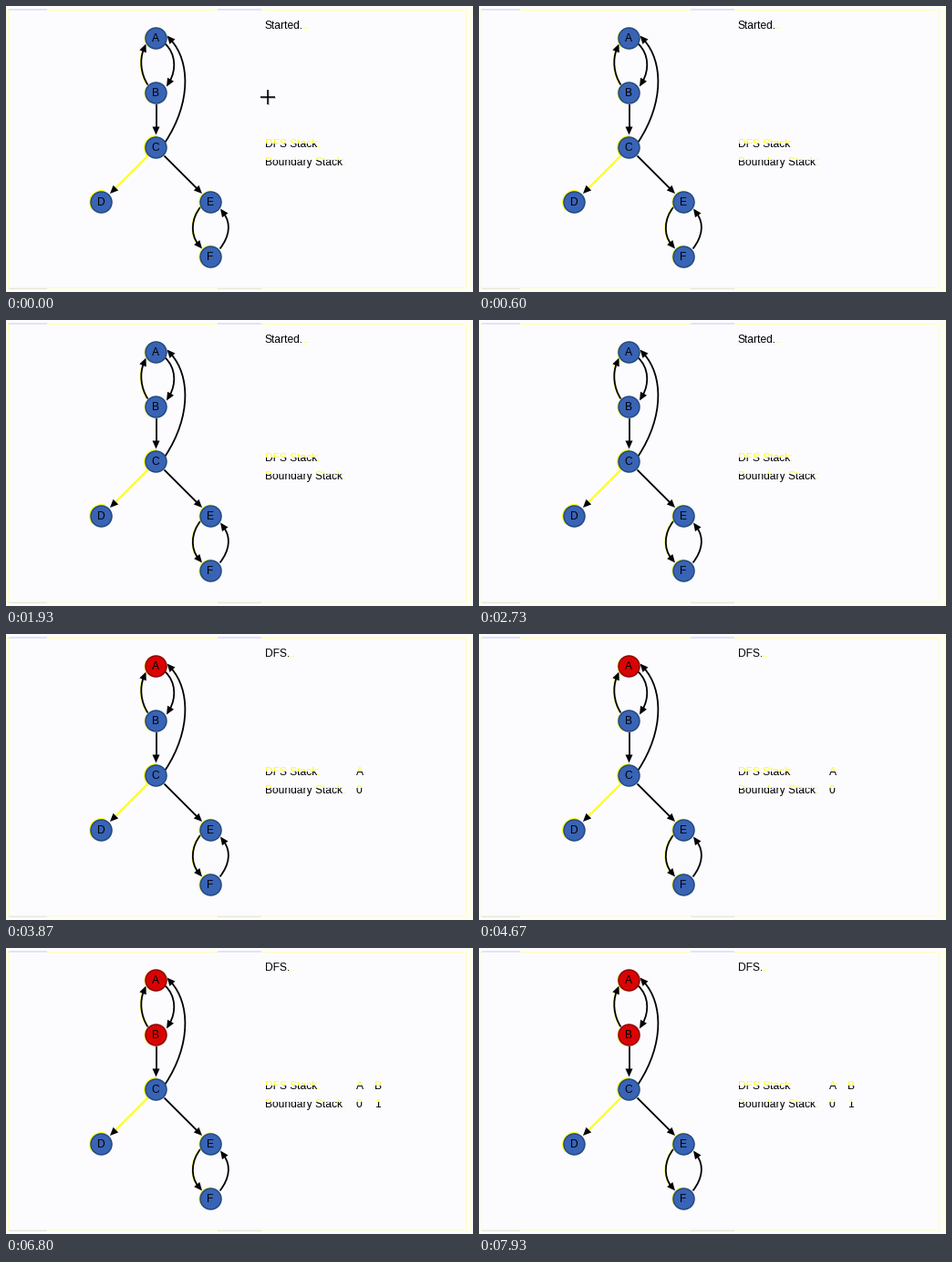
These frames come from a looping animation (512 by 314 pixels, 8 s). A matplotlib script:

```python
import numpy as np
import matplotlib.pyplot as plt
from matplotlib.animation import FuncAnimation
from matplotlib.patches import Arc, Circle, PathPatch, Polygon, Rectangle
from matplotlib.path import Path

W, H, DPI = 512, 314, 100
PX = 72 / DPI
STEP, FRAMES = 50, 160
VISIT_A, VISIT_B = 3270, 6130
CURSOR_END = 550

YELLOW = "#ffff1e"
PALE = "#ffffb4"
LAVENDER = "#e2e2fa"
BLUE, BLUE_RIM = "#3963b5", "#234a7c"
RED, RED_RIM = "#d90303", "#8c0505"

plt.rcParams["font.family"] = "Liberation Sans"
fig = plt.figure(figsize=(W / DPI, H / DPI), dpi=DPI, facecolor="#fcfcff")
ax = fig.add_axes([0, 0, 1, 1])
ax.set_xlim(0, W)
ax.set_ylim(H, 0)
ax.axis("off")


def box(x, y, w, h, color):
    ax.add_patch(Rectangle((x, y), w, h, fc=color, ec="none", lw=0, zorder=0))


def label(x, y, s, color="black", z=6, **kw):
    return ax.text(x, y, s, size=12 * PX, color=color, va="baseline",
                   zorder=z, **kw)


def clipped(x, y, s, color, top, bottom):
    text = label(x, y, s, color)
    text.set_clip_path(Rectangle((0, top), W, bottom - top,
                                 transform=ax.transData))
    text.set_clip_on(True)
    return text


def two_tone(x, y, s, split):
    """Text that is yellow above a level and black below it."""
    return [clipped(x, y, s, YELLOW, 0, split),
            clipped(x, y, s, "black", split, H)]


def stack_column(x, upper, lower):
    return two_tone(x, 155, upper, 151) + two_tone(x, 175, lower, 169)


def curve(points, color, width, z):
    codes = [Path.MOVETO] + [Path.CURVE4] * 3
    if len(points) == 2:
        codes = [Path.MOVETO, Path.LINETO]
    ax.add_patch(PathPatch(Path(points, codes), fc="none", ec=color,
                           lw=width * PX, capstyle="butt", zorder=z))


def edge(*points, color="black", width=1.8, glow=False):
    pts = np.array(points, float) + 0.5
    tip = pts[-1].copy()
    d = tip - pts[-2]
    d /= np.hypot(*d)
    side = np.array([-d[1], d[0]]) * 4
    base = tip - 9 * d
    pts[-1] = tip - 7 * d
    if glow:
        curve(pts - [1, 0], YELLOW, 0.9, 1)
    curve(pts, color, width, 2)
    ax.add_patch(Polygon([tip, base + side, base - side], fc="black",
                         ec="none", lw=0, zorder=3))


def node(name, x, y, start, end, glow):
    center = (x + 0.5, y + 0.5)
    ax.add_patch(Arc(center, 25, 25, theta1=start, theta2=end, ec=YELLOW,
                     lw=glow * PX, zorder=3))
    disc = Circle(center, 11.5, fc=BLUE, ec=BLUE_RIM, lw=1.5 * PX, zorder=4)
    ax.add_patch(disc)
    label(x, y + 4, name, ha="center")
    return disc


# Panel rim
box(0, 4, 505, 1, PALE)
box(0, 309, 505, 1, PALE)
box(2, 4, 1, 306, PALE)
box(504, 4, 1, 306, PALE)
box(508, 0, 3, H, "#ffffe4")
for x0, x1 in ((3, 45), (232, 280)):
    box(x0, 3, x1 - x0, 1.5, LAVENDER)
    box(x0, 309.5, x1 - x0, 1.5, LAVENDER)

# Graph: angles run clockwise on screen because y points down
edge((155, 86), (147, 74), (146, 58), (153, 41), glow=True)
edge((174, 41), (186, 52), (186, 70), (175.5, 88))
edge((164, 107), (164, 141))
edge((174, 149), (203, 105), (201, 60), (176, 32))
edge((155, 164), (113.5, 205.5), color=YELLOW, width=2.2)
edge((173, 164), (214.5, 205.5))
edge((213, 220), (202, 233), (202, 251), (214.5, 266), glow=True)
edge((234, 266), (245, 252), (246, 238), (234.5, 222))

disc_a = node("A", 164, 35, 120, 210, 0.8)
disc_b = node("B", 164, 95, 120, 210, 0.8)
node("C", 164, 155, 140, 275, 2)
node("D", 104, 215, 140, 290, 2)
node("E", 224, 215, 150, 270, 1)
node("F", 224, 275, 150, 270, 1)

# Status line and stacks
started = [label(284, 25, "Started."), label(326, 25, "..", YELLOW)]
running = [label(284, 25, "DFS."), label(311.3, 25, "..", YELLOW)]
stack_column(284, "DFS Stack", "Boundary Stack")
label(341.3, 155, ":", YELLOW)
label(368.7, 175, ":", YELLOW)
entry_a = stack_column(384, "A", "0")
entry_b = stack_column(404, "B", "1")

# Crosshair pointer with a soft shadow
cursor = []
for off, color, width, z in ((1.5, "#c9c9cf", 2, 7), (0, "black", 1.6, 8)):
    cx, cy = 286.5 + off, 99.5 + off
    for xs, ys in (([cx - 8, cx + 8], [cy, cy]), ([cx, cx], [cy - 8, cy + 8])):
        cursor += ax.plot(xs, ys, color=color, lw=width * PX, zorder=z,
                          solid_capstyle="butt")


def paint(disc, visited):
    disc.set_facecolor(RED if visited else BLUE)
    disc.set_edgecolor(RED_RIM if visited else BLUE_RIM)


def show(parts, on):
    for part in parts:
        part.set_visible(on)


def update(i):
    t = i * STEP
    a, b = t >= VISIT_A, t >= VISIT_B
    paint(disc_a, a)
    paint(disc_b, b)
    show(started, not a)
    show(running + entry_a, a)
    show(entry_b, b)
    show(cursor, t < CURSOR_END)
    return []


anim = FuncAnimation(fig, update, frames=FRAMES, interval=STEP,
                     init_func=lambda: update(0), repeat=True,
                     repeat_delay=0, blit=False)
plt.show()
```
